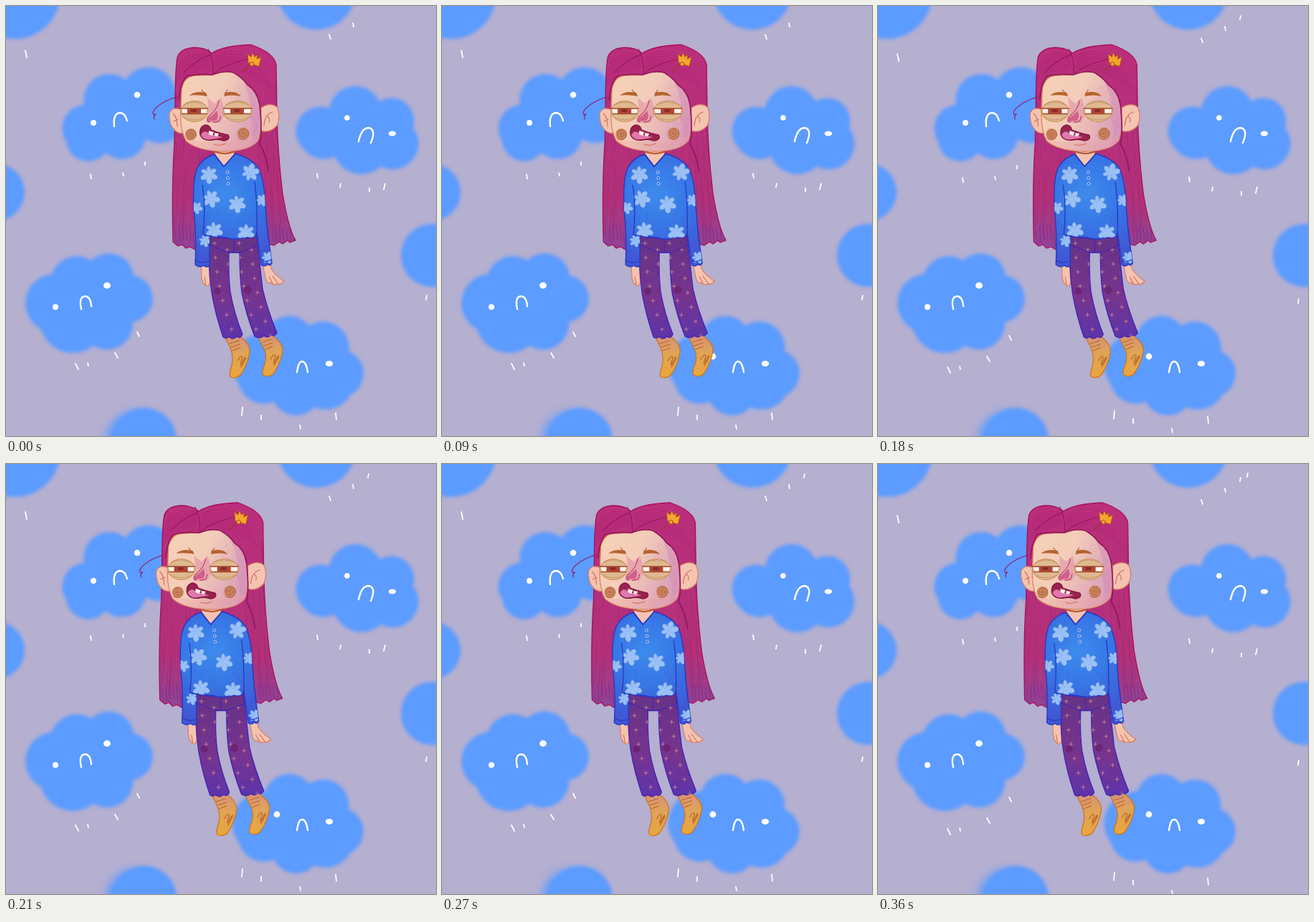
Recreate the animation shown at these times as an HTML page. Size 600 by 600 pixels, loop 0.63 s.

```html
<!DOCTYPE html>
<html lang="en">
<head>
<meta charset="utf-8">
<title>Gloomy clouds</title>
<style>
  html, body { margin: 0; width: 100%; height: 100%; overflow: hidden; background: #b5afd0; }
  svg { display: block; width: 100vw; height: 100vh; }
  path, ellipse, circle { stroke-linecap: round; stroke-linejoin: round; }
  .white { fill: none; stroke: #fff; stroke-width: 2.4; }
  .drops { stroke-width: 1.8; }
  .hair { fill: url(#hairTone); stroke: #a80e55; stroke-width: 1.3; }
  .lock { fill: none; stroke: #94165a; stroke-width: 1.1; }
  .skin { fill: #f4c4b0; stroke: #dc7d62; stroke-width: 1.2; }
  .crease { fill: none; stroke: #cf6b58; stroke-width: 1.1; }
  .knit { fill: url(#knitTone); stroke: #2638c4; stroke-width: 1.4; }
  .pants { fill: url(#pantsTone); stroke: #4424b4; stroke-width: 1.4; }
  .sock { fill: url(#sockTone); stroke: #d0741d; stroke-width: 1.3; }
  .toe { fill: none; stroke: #b9652a; stroke-width: 1.2; }
  .gold { fill: #f2a72e; stroke: #b5521f; stroke-width: 1; }
</style>
</head>
<body>
<svg viewBox="0 0 600 600">
  <defs>
    <filter id="soft" filterUnits="userSpaceOnUse" x="-60" y="-60" width="720" height="720"><feGaussianBlur stdDeviation="2.4"/></filter>
    <filter id="haze" filterUnits="userSpaceOnUse" x="-60" y="-60" width="720" height="720"><feGaussianBlur stdDeviation="7"/></filter>
    <linearGradient id="hairTone" x2="0" y2="1">
      <stop stop-color="#bb2e7c"/><stop offset=".75" stop-color="#b13079"/><stop offset="1" stop-color="#8f4597"/>
    </linearGradient>
    <linearGradient id="faceTone" x2="1" y2=".45">
      <stop stop-color="#f6d2b6"/><stop offset=".5" stop-color="#f3cdb9"/><stop offset="1" stop-color="#dda2b9"/>
    </linearGradient>
    <radialGradient id="knitTone" gradientUnits="userSpaceOnUse" cx="308" cy="262" r="95">
      <stop stop-color="#3d8bec"/><stop offset=".45" stop-color="#3778e6"/><stop offset="1" stop-color="#4058d4"/>
    </radialGradient>
    <linearGradient id="pantsTone" x2="0" y2="1">
      <stop stop-color="#653386"/><stop offset=".6" stop-color="#76348e"/><stop offset="1" stop-color="#5b34ab"/>
    </linearGradient>
    <linearGradient id="sockTone" x2="0" y2="1">
      <stop stop-color="#d8917a"/><stop offset=".4" stop-color="#dfa458"/><stop offset="1" stop-color="#eaa63c"/>
    </linearGradient>
    <path id="hairShape" d="M236 138Q236 90 239 72Q243 59 262 58Q279 58 287 66Q304 55 342 54Q374 65 377 82L378 150Q379 205 386 262Q394 310 404 327L396 330L393 327L386 332L381 329L374 334L367 332L340 325H280L264 340L257 336L251 338L246 333L240 335L233 329Q231 250 235 190Z"/>
    <path id="faceShape" d="M245 115Q249 99 262 97L288 96Q305 89 318 93Q331 101 337 110Q351 119 354 138Q358 170 352 187Q342 202 305 203Q266 202 251 188Q242 171 244 142Z"/>
    <path id="knitShape" d="M291 207L304 224L320 206Q346 214 353 228Q360 243 361 268L365 315L371 359Q368 364 365 360Q361 365 356 361L350 316L350 319Q343 325 337 322Q321 328 307 323Q291 322 284 320L284 362Q280 366 276 362Q270 366 264 361Q266 320 262 285Q260 240 267 226Q275 211 291 207Z"/>
    <path id="pantsShape" d="M283 321Q317 328 350 321Q354 360 358 395Q365 425 378 456Q374 462 370 459Q365 464 360 460Q354 465 347 461Q335 430 329 400Q326 375 326 344L311 344Q310 375 313 400Q319 432 330 458Q327 465 322 461Q316 467 311 461Q307 465 303 462Q292 430 287 400Q282 365 283 321Z"/>
    <clipPath id="hairClip"><use href="#hairShape"/></clipPath>
    <clipPath id="faceClip"><use href="#faceShape"/></clipPath>
    <clipPath id="knitClip"><use href="#knitShape"/></clipPath>
    <clipPath id="pantsClip"><use href="#pantsShape"/></clipPath>
  </defs>

  <rect width="600" height="600" fill="#b5afd0"/>
  <circle cx="180" cy="606" r="40" fill="#5b9bff" filter="url(#haze)"/>
  <g fill="#5b9bff" filter="url(#soft)">
    <circle cx="12" cy="-18" r="64"/><circle cx="433" cy="-22" r="55"/><circle cx="-14" cy="260" r="40"/>
    <circle cx="595" cy="348" r="44"/><circle cx="193" cy="606" r="45"/>
    <path d="M109 138A36 36 0 0 1 167 103A38 38 0 0 1 236 115A41 41 0 0 1 195 186A34 34 0 0 1 139 205A31 31 0 0 1 84 189A33 33 0 0 1 109 138"/>
    <path d="M451 143A37 37 0 0 1 521 133A32 32 0 0 1 568 170A36 36 0 0 1 523 224A40 40 0 0 1 459 210A36 36 0 0 1 413 197A34 34 0 0 1 451 143"/>
    <path d="M64 374A37 37 0 0 1 119 355A35 35 0 0 1 178 376A33 33 0 0 1 177 441A36 36 0 0 1 122 474A46 46 0 0 1 49 451A41 41 0 0 1 64 374"/>
    <path d="M362 457A35 35 0 0 1 423 446A36 36 0 0 1 478 482A33 33 0 0 1 481 542A40 40 0 0 1 430 560A34 34 0 0 1 374 552A36 36 0 0 1 325 528A44 44 0 0 1 362 457"/>
  </g>
  <g class="white">
    <path d="M151 168Q149 150 159 149Q166 149 169 160"/>
    <path d="M492 189Q496 170 506 170Q517 172 509 191"/>
    <path d="M105 423Q101 405 111 405Q118 406 119 419"/>
    <path d="M406 511Q408 496 413 496Q419 496 421 511"/>
  </g>
  <g fill="#fff">
    <circle cx="122" cy="163" r="4"/><circle cx="183" cy="124" r="4.3"/>
    <circle cx="476" cy="156" r="3.8"/><ellipse cx="539" cy="178" rx="5.2" ry="3.4"/>
    <circle cx="69" cy="420" r="4"/><ellipse cx="141" cy="390" rx="5" ry="4.4"/>
    <circle cx="378" cy="489" r="4.4"/><ellipse cx="451" cy="499" rx="5.2" ry="4"/>
  </g>
  <g id="rain" class="white drops">
    <path d="M27 62l2 10M451 40l2 6M484 24l1 5M118 235l1 6M163 233l1 4M194 218v4M434 234l1 6M467 248l-1 5M507 254v5M529 248l-2 8
      M97 499l4 8M114 498l1 4M152 484l4 7M183 455l3 6M330 560l-1 11M356 571v6M410 585l1 5M460 568l1 9M587 404l-1 6"/>
    <path class="late" d="M506 9l-1 5"/>
    <path class="late" d="M516 3l-1 5"/>
  </g>

  <g id="girl">
    <use href="#hairShape" class="hair"/>
    <g id="strands" clip-path="url(#hairClip)"></g>
    <path class="lock" d="M282 60Q290 74 289 95M286 68Q266 74 248 93M290 94Q310 78 350 72"/>

    <path class="skin" d="M245 145Q232 139 228 150Q227 166 236 174Q242 179 248 177Z"/>
    <path class="skin" d="M356 142Q369 134 378 141Q384 153 378 167Q368 178 355 174Z"/>
    <path class="crease" d="M233 150Q239 155 239 168M234 161L240 158M372 148Q361 151 360 167M365 154Q369 157 367 162"/>
    <path class="skin" d="M291 198L292 209L304 224L318 208L318 198Z"/>
    <path class="crease" style="stroke:#b5522f;stroke-width:2" d="M291 203Q306 209 318 203"/>

    <use href="#faceShape" fill="url(#faceTone)" stroke="#d98458" stroke-width="1.3"/>
    <g id="blush" clip-path="url(#faceClip)">
      <path fill="#cf86b4" opacity=".4" d="M331 104L356 120V195L338 200Q350 174 339 154Q346 138 331 104Z"/>
      <path fill="#dd86a4" opacity=".5" d="M281 128L291 136L300 128L306 150L299 163H279L283 150Z"/>
      <path fill="#e9a0a2" opacity=".35" d="M252 186Q300 195 352 180V205H250Z"/>
    </g>
    <path class="lock" style="stroke-width:1.7" d="M241 131Q244 106 252 98Q270 94 288 96Q305 89 318 93Q331 101 337 110Q351 119 354 138Q358 176 354 192Q364 210 366 230"/>
    <path class="lock" d="M238 127Q215 134 206 146Q203 153 209 151Q205 154 207 158"/>

    <path fill="#b5642d" d="M256 125Q263 118 279 121L281 126Q267 123 256 125ZM304 126L306 121Q320 117 328 126Q316 123 304 126Z"/>
    <path class="crease" style="stroke:#ad5035" d="M273 117L278 123M309 117L305 123"/>
    <g id="eyes"></g>
    <path fill="#c94a7d" opacity=".75" d="M294 146Q289 153 281 157L282 161L293 160Q298 155 294 146Z"/>
    <path class="crease" style="stroke:#b03a5e" d="M297 132Q295 145 282 155Q278 160 284 162M289 162Q299 163 299 154"/>

    <path fill="#98234f" stroke="#8a1743" stroke-width="1.4" d="M271 180Q269 169 278 166Q285 166 286 173Q299 178 310 180Q314 186 304 188Q295 185 288 187Q275 189 271 180Z"/>
    <path fill="#df78ad" d="M272 180Q276 171 285 179L302 183Q295 185 286 186Q276 188 272 180Z"/>
    <path fill="#fff4e8" d="M283 174L290 176L288 181L283 179ZM291 177L297 178L295 182L291 181Z"/>
    <path class="crease" d="M290 193Q298 196 306 192"/>
    <g id="cheeks" stroke="#ab5637"></g>

    <path class="gold" d="M338 79L337 67L342 71L344 65L347 71L351 68L350 74L356 71L353 84Z"/>
    <path class="lock" style="stroke:#9d3524" d="M341 82L330 91"/>
    <circle class="gold" cx="343" cy="81" r="2.8"/>

    <path class="skin" d="M272 361L273 380Q275 389 281 391Q286 389 284 378L284 361Z"/>
    <path class="skin" d="M358 360L362 379Q364 388 369 386Q373 390 376 388Q383 390 388 384Q378 378 370 367L370 359Z"/>
    <path class="crease" d="M367 378L372 387M372 377L380 388M277 378L279 389"/>

    <path class="sock" d="M306 463L327 461Q341 472 340 483Q337 501 327 515Q320 521 313 517Q311 513 315 502Q318 489 313 477Z"/>
    <path class="sock" d="M352 462L371 459Q387 471 386 481Q383 499 373 513Q367 519 359 515Q356 511 361 500Q365 487 359 476Z"/>
    <path id="toes" class="toe" d="M312 471L325 467M314 476L326 472M316 481L326 477M323 495Q329 485 330 491Q325 505 329 499Q336 485 334 493L328 504"/>
    <use href="#toes" x="46" y="-2"/>

    <use href="#pantsShape" class="pants"/>
    <g id="stars" clip-path="url(#pantsClip)"></g>
    <circle cx="295" cy="398" r="5" fill="#6b216f" opacity=".8"/><circle cx="337" cy="396" r="5.5" fill="#6b216f" opacity=".8"/>
    <path fill="none" stroke="#4424b4" stroke-width="1.2" d="M283 333Q306 342 311 344H326Q335 341 351 334M318 326V343"/>

    <use href="#knitShape" class="knit"/>
    <g id="flowers" clip-path="url(#knitClip)"></g>
    <path fill="none" stroke="#2638c4" stroke-width="1.3" d="M274 250Q279 280 275 319L284 321M347 246Q351 275 350 320M290 207L304 224L320 206M264 355Q274 360 284 356M355 355Q362 358 370 354"/>
    <g fill="#2c5bd8" stroke="#b9d5ff"><circle cx="309" cy="232" r="1.9"/><circle cx="309.5" cy="240" r="1.9"/><circle cx="310" cy="248" r="1.9"/></g>
  </g>
</svg>
<script>
const STEP = 30, LOOP = 630, LAST = 12, SLIDE = 28.4, FALL = 5;
const el = id => document.getElementById(id);
const add = (id, markup) => el(id).insertAdjacentHTML('beforeend', markup);
let seed = 7;
const rnd = (a, b) => {
  seed = seed * 16807 % 2147483647;
  return a + (b - a) * seed / 2147483647;
};
// Closed or open curve traced by a radius function
const polar = (x, y, radius, turns = 1) => {
  const points = [];
  for (let a = 0; a < turns * 2 * Math.PI; a += .1) points.push(`${x + radius(a) * Math.cos(a)} ${y + radius(a) * Math.sin(a)}`);
  return 'M' + points.join('L');
};
const speckle = (id, x0, y0, x1, y1, n, color) => {
  let d = '';
  for (let i = 0; i < n; i++) d += `M${rnd(x0, x1).toFixed(1)} ${rnd(y0, y1).toFixed(1)}h.1`;
  add(id, `<path d="${d}" fill="none" stroke="${color}" stroke-width=".9" opacity=".5"/>`);
};

// Hair strands fan out from the middle; combed arcs lie on top
for (let i = 0; i < 130; i++) {
  const x = rnd(232, 390), bend = (x - 305) / 14;
  add('strands', `<path d="M${x} ${rnd(100, 285)}q${bend / 3} 35 ${bend} ${rnd(45, 75)}" fill="none" stroke="${i % 3 ? '#8f2470' : '#d43b80'}" stroke-width=".7" opacity=".45"/>`);
}
for (let x = 236; x < 402; x += 5) add('strands', `<path d="M${x} ${rnd(304, 322)}l2 22" stroke="#7d3090"/>`);
for (let i = 0; i < 9; i++) {
  add('strands', `<path d="M292 ${70 + i * 2}Q${318 + i * 3} ${56 + i * 4} ${350 + i * 3} ${72 + i * 6}M284 ${68 + i * 2}Q${262 - i} ${60 + i * 4} ${243 - i} ${77 + i * 4}" fill="none" stroke="#a11b68" stroke-width=".8" opacity=".5"/>`);
}

speckle('blush', 320, 110, 355, 195, 120, '#a27fc9');
speckle('blush', 250, 110, 330, 200, 90, '#e59ba2');

const eye = (x, rx) => `
  <ellipse cx="${x}" cy="147" rx="${rx}" ry="14.5" fill="#dfb98f" stroke="#c88c50"/>
  <path d="M${x - rx + 1} 143H${x + rx - 1}L${x + rx - 3} 150H${x - rx + 3}Z" fill="#fff3ec"/>
  <rect x="${x - 10}" y="143" width="19" height="7" fill="#b04634"/>
  <rect x="${x - 5}" y="144" width="8" height="4" fill="#8a2b2a"/>
  <path d="M${x - rx} 143H${x + rx}M${x - rx + 2} 150.5H${x + rx - 2}" stroke="#a5482f" stroke-width="1.3"/>
  <path d="M${x - rx + 4} 155Q${x} 163 ${x + rx - 4} 155M${x - rx + 4} 138Q${x} 130 ${x + rx - 4} 138" fill="none" stroke="#bd8b61" stroke-width=".8"/>`;
add('eyes', eye(263, 19) + eye(323, 20));

const cheek = (x, y, r) => `<circle cx="${x}" cy="${y}" r="${r}" fill="#cb8660" stroke="none"/>
  <path d="${polar(x, y, a => r * a / 15, 2.4)}" fill="none"/>`;
add('cheeks', cheek(258, 179, 8) + cheek(331, 178, 8.5));

// Staggered crosses follow the bend of the legs
speckle('stars', 282, 322, 378, 462, 300, '#a04b91');
for (let row = 0; row < 7; row++) {
  for (let col = 0; col < 4; col++) {
    const y = 331 + row * 20 + col % 2 * 9, x = 291 + col * 17 + (y - 322) ** 2 / 700;
    add('stars', `<path d="M${x} ${y - 4}l.8 3.2l3.2.8l-3.2.8l-.8 3.2l-.8-3.2l-3.2-.8l3.2-.8z" fill="#c98594" opacity=".8"/>`);
  }
}

speckle('flowers', 262, 290, 372, 364, 230, '#4c36bb');
speckle('flowers', 275, 215, 350, 310, 130, '#60a4ff');
const flower = (x, y, size) => {
  const turn = rnd(0, 3), petal = a => size * (.5 + .45 * Math.abs(Math.sin(3 * a + turn)) + .15 * Math.sin(a + turn));
  add('flowers', `<path d="${polar(x, y, petal)}Z" fill="#a0c5f6" stroke="#5b8be6" stroke-width=".7"/>
    <path d="${polar(x, y, a => petal(a) * a / 20, 3)}" fill="none" stroke="#80adf0" stroke-width=".6"/>`);
};
for (const [x, y] of [[283, 234], [340, 233], [285, 268], [322, 275], [290, 312], [335, 315]]) flower(x, y, 13);
for (const [x, y] of [[265, 281], [356, 271], [364, 351], [277, 327]]) flower(x, y, 9);

function draw(now) {
  const step = Math.min(LAST, Math.floor(now % LOOP / STEP)), pose = Math.floor(step / 6);
  el('girl').setAttribute('transform', `translate(${-Math.min(step * 2.62, SLIDE)} 0)`);
  el('rain').setAttribute('transform', `translate(0 ${pose * FALL})`);
  document.querySelectorAll('.late').forEach((drop, i) => drop.style.opacity = +(pose > i));
  requestAnimationFrame(draw);
}
draw(performance.now());
</script>
</body>
</html>
```
